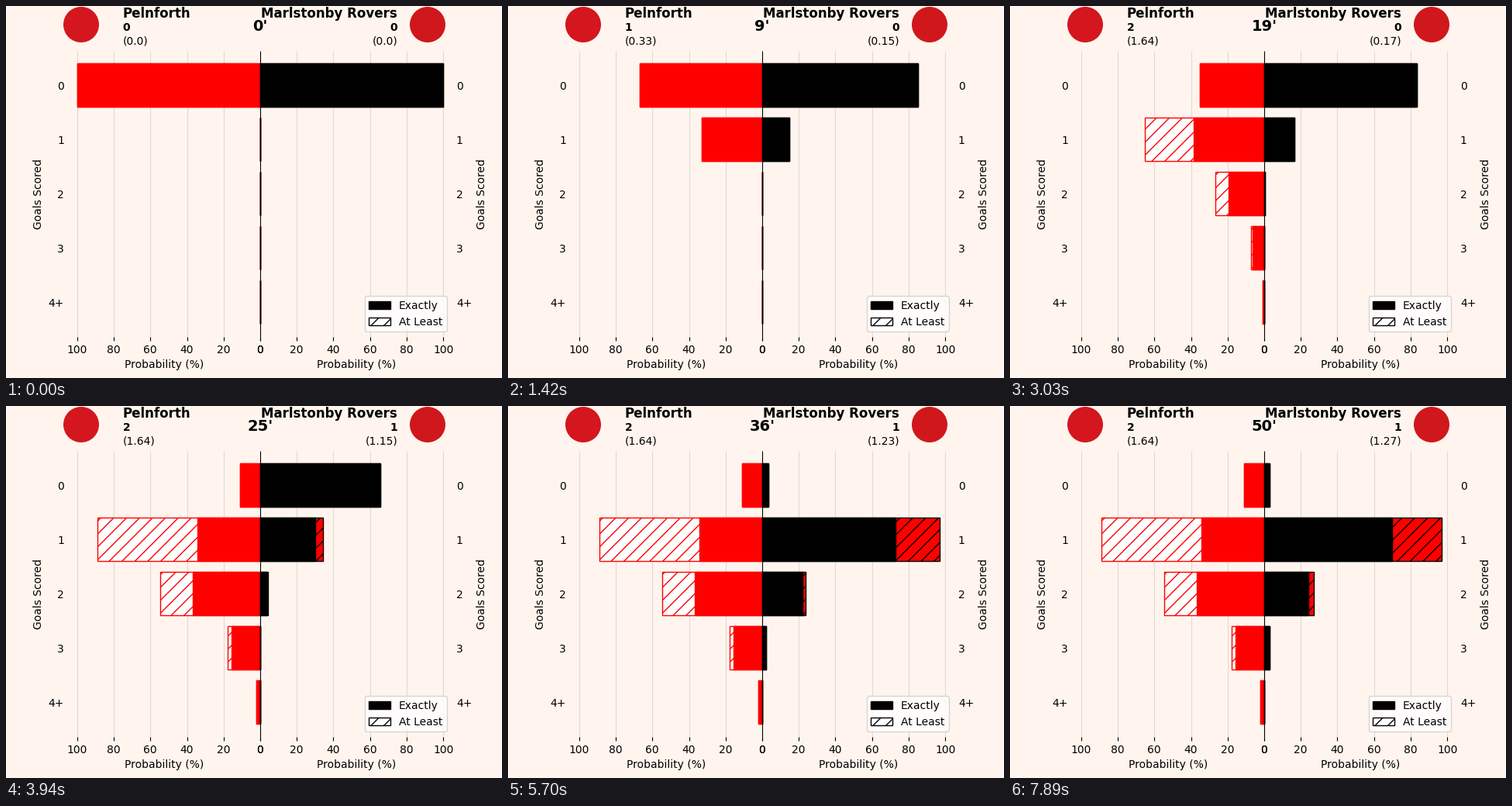
A matplotlib script for the animation above (8000 ms loop, 640 px wide and 480 px high).

```python
import numpy as np
import matplotlib.pyplot as plt
from matplotlib.animation import FuncAnimation
from matplotlib.patches import Circle, Patch, Rectangle

W, H, DPI = 640, 480, 100
LOOP, STEP = 8000, 20
MINUTE, TWEEN, TWEENS = 160, 30, 5
PT = DPI / 72

MID, TOP, BOTTOM = 328, 57.6, 427.2
UNIT = 248 / 105           # pixels per percent
ROW, FIRST = 70, 102.4     # row pitch and centre of the first row
BAR = 0.8 * ROW
LAST_MINUTE = 50

# minute -> chance values of the shots taken
HOME = {"shots": {7: [0.33], 16: [0.24], 19: [0.53, 0.536]}, "goals": [7, 19]}
AWAY = {"shots": {4: [0.15], 11: [0.02], 23: [0.023], 25: [0.957],
                  30: [0.026], 33: [0.052], 38: [0.034], 40: [0.01]},
        "goals": [25]}


def taken(team, minute):
    return [p for m, ps in team["shots"].items() if m <= minute for p in ps]


def odds(team, minute):
    """Percent chance of exactly and of at least 0, 1, 2, 3, 4+ goals."""
    dist = np.array([1.0])
    for p in taken(team, minute):
        dist = np.convolve(dist, [1 - p, p])
    dist = np.pad(dist, (0, 5))
    least = np.cumsum(dist[::-1])[::-1][:5]
    exact = dist[:5].copy()
    exact[4] = least[4]
    least[0] = exact[0]
    return 100 * np.array([exact, least])


def build_timeline():
    starts, states, t = [], [], 0
    for minute in range(LAST_MINUTE + 1):
        if minute in HOME["shots"] or minute in AWAY["shots"]:
            for i in range(TWEENS):
                starts.append(t)
                states.append((minute, (i + 1) / TWEENS))
                t += TWEEN
        else:
            starts.append(t)
            states.append((minute, 1.0))
            t += MINUTE
    return starts, states


starts, states = build_timeline()
for team in (HOME, AWAY):
    team["odds"] = [odds(team, m) for m in range(-1, LAST_MINUTE + 1)]

plt.rcParams["font.family"] = "DejaVu Sans"
fig = plt.figure(figsize=(W / DPI, H / DPI), dpi=DPI, facecolor="seashell")
ax = fig.add_axes([0, 0, 1, 1])
ax.set_xlim(0, W)
ax.set_ylim(H, 0)
ax.axis("off")


def label(x, y, s, size=10, **kw):
    return ax.text(x, y, s, fontsize=size, **kw)


def vline(x, y0, y1, color="black", **kw):
    ax.plot([x, x], [y0, y1], color=color, lw=0.8, solid_capstyle="butt", **kw)


# Axes, grid and labels
tick = 3.5 * PT
for side in (-1, 1):
    for value in range(0, 101, 20):
        x = MID + side * value * UNIT
        if value:
            vline(x, TOP, BOTTOM, "#b0b0b0", alpha=0.4, zorder=0.5)
        vline(x, BOTTOM, BOTTOM + tick)
        label(x, BOTTOM + 2 * tick, str(value), ha="center", va="top")
    label(MID + side * 124, 456.4, "Probability (%)", ha="center", va="top")
    for i, name in enumerate(["0", "1", "2", "3", "4+"]):
        label(MID + side * (248 + tick), FIRST + i * ROW, name,
              ha="right" if side < 0 else "left", va="center_baseline")
    label(MID + side * 278.9, (TOP + BOTTOM) / 2, "Goals Scored", rotation=90,
          rotation_mode="anchor", ha="center",
          va="bottom" if side < 0 else "top")
vline(MID, TOP, BOTTOM, zorder=2.5)

# Badges
ax.add_patch(Circle((97, 24), 23, color="#d4161f", lw=0))
ax.add_patch(Circle((544, 24), 23, color="#d0181c", lw=0))


def add_bars(face, edge, hatch=None):
    bars = [Rectangle((MID, FIRST + i * ROW - BAR / 2), 0, BAR, facecolor=face,
                      edgecolor=edge, hatch=hatch, lw=1) for i in range(5)]
    for bar in bars:
        ax.add_patch(bar)
    return bars


def add_team(team, side, name, face, back):
    x, ha = MID + side * 75 * UNIT, "left" if side < 0 else "right"
    label(x, 14.9, name, 12, weight="bold", ha=ha)
    team["side"] = side
    team["score"] = label(x, 32.4, "0", weight="bold", ha=ha)
    team["xg"] = label(x, 49.9, "(0.0)", ha=ha)
    team["least"] = add_bars(back, face, "//")
    team["exact"] = add_bars(face, face)


add_team(HOME, -1, "Pelnforth", "red", "white")
add_team(AWAY, 1, "Marlstonby Rovers", "black", "red")
clock = label(MID, 32.4, "0'", 14, weight="bold", ha="center")

ax.legend(handles=[Patch(facecolor="black", edgecolor="black", label="Exactly"),
                   Patch(facecolor="white", edgecolor="black", hatch="//",
                         label="At Least")],
          loc="lower right", fontsize=10, bbox_to_anchor=(0.5125, 0.11, 0.3875, 0.77),
          bbox_transform=fig.transFigure)


def update(k):
    t = k * STEP + STEP / 2
    minute, part = states[np.searchsorted(starts, t, side="right") - 1]
    clock.set_text(f"{minute}'")
    for team in (HOME, AWAY):
        old, new = team["odds"][minute], team["odds"][minute + 1]
        exact, least = old + (new - old) * part
        for i in range(5):
            team["exact"][i].set_width(team["side"] * exact[i] * UNIT)
            team["least"][i].set_width(team["side"] * least[i] * UNIT)
        team["score"].set_text(str(sum(g <= minute for g in team["goals"])))
        team["xg"].set_text(f"({round(float(sum(taken(team, minute))), 2)})")
    return []


anim = FuncAnimation(fig, update, frames=LOOP // STEP, interval=STEP,
                     init_func=lambda: update(0), repeat=True, repeat_delay=0)
plt.show()
```
